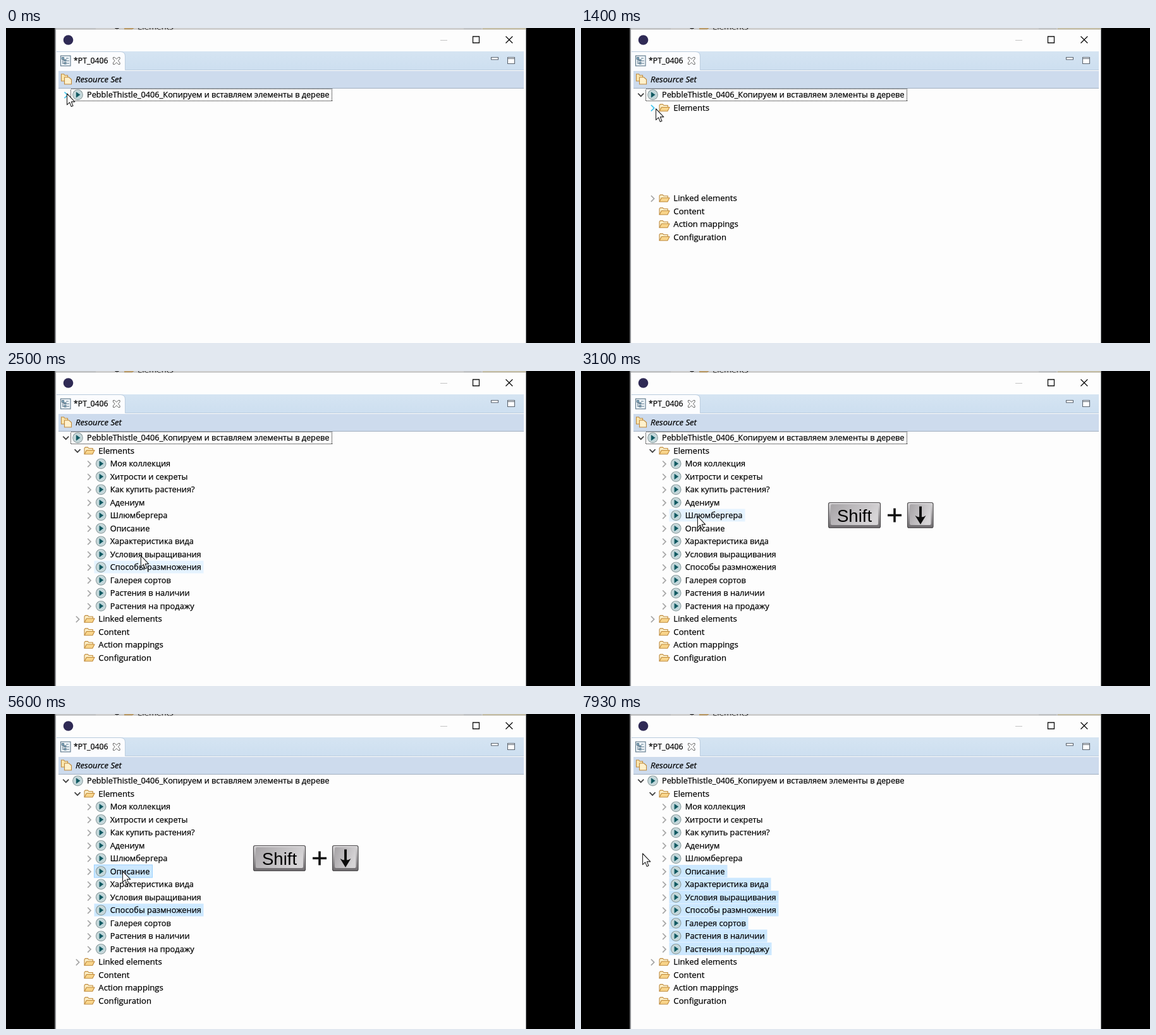
Animation, 900 px wide and 499 px high, one loop 8 s. Source, as an HTML page:

```html
<!DOCTYPE html>
<html lang="ru">
<head>
<meta charset="utf-8">
<title>Tree selection</title>
<style>
  html, body { margin: 0; width: 100%; height: 100%; overflow: hidden; background: #000; }
  svg { display: block; width: 900px; height: 499px; }
  text { font-family: "Open Sans", "Noto Sans", sans-serif; fill: #000; stroke: #000; stroke-width: .25; white-space: pre; }
  .key text { font-family: "Liberation Sans", Arial, sans-serif; font-size: 27.5px; stroke: none; }
  .line { fill: none; stroke: #111; }
</style>
</head>
<body>
<svg viewBox="0 0 900 499">
  <defs>
    <linearGradient id="strip" x2="0" y2="1">
      <stop offset="0" stop-color="#d5e4f2"/><stop offset="1" stop-color="#cddff0"/>
    </linearGradient>
    <linearGradient id="rim" x2="0" y2="1">
      <stop offset="0" stop-color="#dcdadc"/><stop offset="1" stop-color="#6c696c"/>
    </linearGradient>
    <linearGradient id="face" x2="1" y2=".4">
      <stop offset="0" stop-color="#a6a3a6"/><stop offset="1" stop-color="#d6d4d6"/>
    </linearGradient>
    <clipPath id="sliver"><path d="M78 0H822V2.5H78z"/></clipPath>
    <g id="play">
      <circle r="7.8" fill="#cfdcdd" stroke="#8c9fa2" stroke-width="1.2"/>
      <circle r="5.8" fill="#bfd6da"/>
      <path d="M-2.6 -4.6L4 0L-2.6 4.6z" fill="#125a62"/>
    </g>
    <g id="folder" stroke="#bf8a3c" stroke-width="1.1" stroke-linejoin="round">
      <path d="M-7.8 5.4V-4l1.2-1.4h4.2L-1-3.8H5.4V-.6" fill="#fdf0c8"/>
      <path d="M-7.8 5.4L-4.4-.8H8.2L5 5.4z" fill="#f8d48a"/>
    </g>
  </defs>

  <!-- window frame -->
  <path d="M77 0H823V499H77z" fill="#fdfdfd"/>
  <g clip-path="url(#sliver)">
    <path d="M78 0H142V3H78zM724 0H752V3H724z" fill="#e8ebee"/>
    <path d="M754 0H822V3H754z" fill="#eee2b8"/>
    <path d="M172 0h7l-3.5 3z" fill="#333"/>
    <path d="M187 0h15l-2 3h-13z" fill="#dca64e"/>
    <text x="208" y="2.5" font-size="13.2">Elements</text>
  </g>
  <path d="M78 1.5H822" stroke="#8d8d8d"/>
  <path d="M78 0V499" stroke="#85878a" stroke-width="2"/>
  <path d="M822.5 0V499" stroke="#85878a"/>
  <circle cx="98.5" cy="19" r="7.8" fill="#2f2a55"/>
  <path class="line" d="M687 19.5h11" style="stroke:#c4c4c4"/>
  <path class="line" d="M738.5 13.5h10v10h-10zM790.5 13.2l10.8 10.8m0-10.8L790.5 24" stroke-width="1.3"/>

  <!-- tab strip and header -->
  <path d="M80 37H819V66.5H80z" fill="url(#strip)"/>
  <path d="M80 67V38H182Q188 38 188.5 45V67z" fill="#fbfcfe"/>
  <path class="line" d="M80 37.5H182Q188.5 38 188.5 45V66.5H819" style="stroke:#b3c6d9" stroke-width=".8"/>
  <path d="M83 68H819V95H83z" fill="#cddbed"/>
  <path d="M83 95.5H819" stroke="#a2b0c0"/>
  <g class="line" stroke-width="1.1" style="stroke:#597487">
    <rect x="86.5" y="44" width="15.5" height="16" fill="#f1f7fb"/>
    <path d="M90 47v10M90 51h4M90 56h4M95 48h4M96 52h4M96 56h4"/>
    <path d="M88.5 46.5h3v3h-3zM92.5 50h2.5v2.5h-2.5zM92.5 54.5h2.5v2.5h-2.5z" fill="#8dbbd1"/>
  </g>
  <text x="107" y="56.4" font-size="12.3">*PT_0406</text>
  <path d="M169.5 46.5h2.5l2.8 3 2.8-3h2.5v2.5l-2.7 3 2.7 3v2.5h-2.5l-2.8-3-2.8 3h-2.5v-2.5l2.7-3-2.7-3z"
        fill="#fff" stroke="#686868"/>
  <g fill="#fff" stroke="#5c6570" stroke-width="1.1">
    <path d="M767.5 46.5h11v3.5h-11zM793.5 46.5h11v10h-11zM793.5 48.5h11"/>
  </g>
  <g stroke="#bf8a3c" stroke-width="1.1" fill="#fbe6ae">
    <path d="M87.5 84V73h4l1.5 2h4.5v9z"/>
    <path d="M92.5 89V78h7l4 3.5V89z" fill="#fff1cc"/>
  </g>
  <text x="110" y="86.3" font-size="13.2" font-style="italic">Resource Set</text>

  <g id="tree"></g>

  <g id="keys" class="key">
    <g stroke="#4e4c4e" stroke-width="1.2">
      <rect x="391.5" y="208.5" width="82" height="40" rx="2.5" fill="url(#rim)"/>
      <rect x="516.5" y="208.5" width="40.5" height="40" rx="2.5" fill="url(#rim)"/>
    </g>
    <rect x="395" y="211" width="75" height="33" rx="2" fill="url(#face)"/>
    <rect x="520" y="211" width="33.5" height="33" rx="2" fill="url(#face)"/>
    <text x="405" y="238.6">Shift</text>
    <path class="line" d="M485 228.5h22M496 217.5v22" stroke-width="3.6"/>
    <path class="line" d="M537 214.500v18" stroke-width="4"/>
    <path d="M528.500 229Q533 232 537 231.500Q541 232 545.500 229L537 243z" fill="#0c0c0c"/>
  </g>

  <path id="cursor" d="M.5 0V17.7L4.6 13.9L7.3 20.5L10 19.3L7.3 12.9H12.8z"
        fill="#fff" stroke="#222" stroke-width="1.1" stroke-linejoin="round"/>
</svg>
<script>
const LOOP = 8000, ROW = 20.5, TOP = 105.5, INDENT = 18.35, LAG = 33;
const LATIN = 13.15, CYRILLIC = 12.8;
const KIDS = ["Моя коллекция", "Хитрости и секреты", "Как купить растения?", "Адениум",
  "Шлюмбергера", "Описание", "Характеристика вида", "Условия выращивания",
  "Способы размножения", "Галерея сортов", "Растения в наличии", "Растения на продажу"];
const TAIL = ["Linked elements", "Content", "Action mappings", "Configuration"];
const ANCHOR = 7; // row of the first selected item

// time, x, y
const PATH = [[0, 96, 104], [400, 96, 104], [660, 106, 172], [960, 118, 128], [2130, 118, 128],
  [2440, 214, 312], [2500, 213, 293], [2700, 190, 234], [2900, 184, 230], [3100, 184, 230],
  [3200, 178, 248], [4200, 178, 248], [4230, 184, 249], [7730, 184, 249], [7930, 97, 221], [LOOP, 97, 221]];
// time, rows the lower folders have moved down
const SHIFT = [[0, 0], [1200, 1], [1330, 2], [1360, 4], [1400, 6], [1430, 8], [1460, 10], [1500, 12]];
// each extension of the selection: first repaint, full repaint
const EXTEND = [[5230, 5260], [5430, 5460], [5600, 5660], [5770, 5800], [6030, 6100], [6660, 6700]];

const $ = id => document.getElementById(id);
const tree = $("tree"), keys = $("keys"), cursor = $("cursor");
const clamp = v => Math.max(0, Math.min(1, v));

function add(parent, tag, attrs) {
  const el = document.createElementNS("http://www.w3.org/2000/svg", tag);
  for (const k in attrs) el.setAttribute(k, attrs[k]);
  return parent.appendChild(el);
}

function makeRow(label, level, kind, size, hasArrow) {
  const g = add(tree, "g", {}), dx = level * INDENT;
  const left = 102.5 + Math.round(dx);
  const box = add(g, "rect", { x: left, y: -10, height: 20, fill: "none" });
  const arrow = hasArrow && add(g, "path", { fill: "none", "stroke-width": 1.7 });
  add(g, "use", { href: "#" + kind, x: 113.5 + dx, y: 0.3 });
  const text = add(g, "text", { x: 128 + dx, y: 4.7, "font-size": size });
  text.textContent = label;
  const width = Math.round(128 + dx + text.getComputedTextLength() + 4 - left);
  box.setAttribute("width", width);
  return { g, box, arrow, left, right: left + width, arrowX: 94.7 + dx };
}

const root = makeRow("PebbleThistle_0406_Копируем и вставляем элементы в дереве", 0, "play", 12.74, true);
const elements = makeRow("Elements", 1, "folder", LATIN, true);
const kids = KIDS.map(s => makeRow(s, 2, "play", CYRILLIC, true));
const tail = TAIL.map((s, i) => makeRow(s, 1, "folder", LATIN, i === 0));
const rows = [root, elements, ...kids, ...tail];

const focus = add(root.g, "rect", { x: root.left, y: -9, width: root.right - root.left, height: 19,
  fill: "none", stroke: "#000", "stroke-dasharray": "1 1", "shape-rendering": "crispEdges" });

function cursorAt(t) {
  let i = 1;
  while (i < PATH.length - 1 && t >= PATH[i][0]) i++;
  const [t0, x0, y0] = PATH[i - 1], [t1, x1, y1] = PATH[i];
  const k = clamp((t - t0) / (t1 - t0));
  return [x0 + (x1 - x0) * k, y0 + (y1 - y0) * k];
}

function isSelected(row, t) {
  if (t < 3930 || row < ANCHOR) return false;
  const n = EXTEND.filter(e => t >= e[0]).length, last = ANCHOR + n;
  if (row > last) return false;
  const repainting = n > 0 && t < EXTEND[n - 1][1];
  return !(repainting && (row === last - 1 || row === last - 2));
}

function paintRow(row, index, t, [px, py], open) {
  const y = TOP + ROW * index;
  const inRow = Math.abs(py - y) < ROW / 2;
  const hover = inRow && px >= row.left && px <= row.right;
  const selected = kids.includes(row) && isSelected(index, t);
  row.g.setAttribute("transform", `translate(0 ${y})`);
  row.box.setAttribute("fill", selected ? "#cce8ff" : hover ? "#e5f3ff" : "none");
  row.box.setAttribute("stroke", selected && hover ? "#99d1ff" : "none");
  if (!row.arrow) return;
  const x = row.arrowX, hot = inRow && Math.abs(px - x) < 7;
  row.arrow.setAttribute("d", open ? `M${x - 4.5} -1.8l4.5 4.5 4.5-4.5` : `M${x - 2.2} -4l4.8 4.8-4.8 4.8`);
  row.arrow.setAttribute("stroke", hot ? "#3fc3ee" : open ? "#404040" : "#a6a6a6");
}

function render(t) {
  const [x, y] = cursorAt(t), point = cursorAt(Math.max(0, t - LAG));
  const rootOpen = t >= 100, kidsOpen = t >= 1500;
  const shift = SHIFT.filter(s => t >= s[0]).pop()[1];
  rows.forEach((row, i) => {
    const isKid = kids.includes(row), isTail = tail.includes(row);
    const shown = row === root || (isKid ? kidsOpen : rootOpen);
    row.g.style.display = shown ? "" : "none";
    if (!shown) return;
    const index = isTail ? i - KIDS.length + shift : i;
    paintRow(row, index, t, point, row === root ? rootOpen : row === elements && kidsOpen);
  });
  focus.style.display = t < 3760 ? "" : "none";
  keys.style.opacity = clamp((t - 2600) / 300) * clamp((7930 - t) / 200);
  cursor.setAttribute("transform", `translate(${x} ${y})`);
}

const start = performance.now();
function tick() {
  render((performance.now() - start) % LOOP);
  requestAnimationFrame(tick);
}
tick();
</script>
</body>
</html>
```
